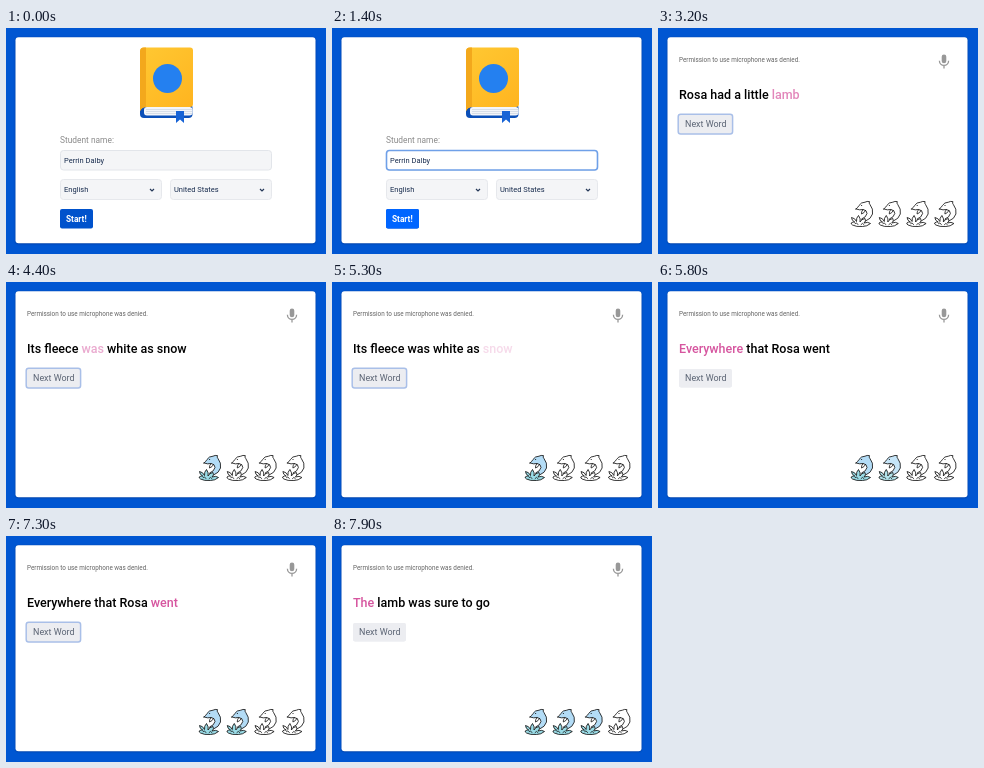
Animation of 320x226 px, one loop 8000 ms. Source, as an HTML page with a canvas:

```html
<!DOCTYPE html>
<html lang="en">
<head>
<meta charset="utf-8">
<title>Reading practice</title>
<style>
  html, body { margin: 0; width: 100%; height: 100%; overflow: hidden; background: #0056d2; }
  canvas { display: block; width: 320px; height: 226px; }
</style>
</head>
<body>
<canvas id="stage"></canvas>
<script>
const W = 320, H = 226, LOOP = 8000;
const INK = '#172b4d', PINK = '#d6559f', LINE = '#151515';
const canvas = document.getElementById('stage');
const ctx = canvas.getContext('2d');
const dpr = window.devicePixelRatio || 1;
canvas.width = W * dpr;
canvas.height = H * dpr;

// Each line lists the moment every word becomes the current one.
const LINES = [
  { text: 'Rosa had a little lamb', starts: [1600, 2450, 2600, 2760, 3100] },
  { text: 'Its fleece was white as snow', starts: [3500, 4190, 4330, 4600, 4860, 5270] },
  { text: 'Everywhere that Rosa went', starts: [5650, 6590, 6830, 7090] },
  { text: 'The lamb was sure to go', starts: [7500] }
];
const FADE_IN = 140, FADE_OUT = 100;
const TIMES = { focus: 900, startHover: 1350, practice: 1600, nextHover: 2050 };

const progress = (t, start, length = 200) => Math.max(0, Math.min(1, (t - start) / length));

function text(str, x, y, size, color, weight = 400) {
  ctx.font = `${weight} ${size}px Roboto, sans-serif`;
  ctx.fillStyle = color;
  ctx.fillText(str, x, y);
}

function box(x, y, w, h, r, fill, stroke, line = 1) {
  ctx.beginPath();
  ctx.roundRect(x, y, w, h, r);
  if (fill) { ctx.fillStyle = fill; ctx.fill(); }
  if (stroke) { ctx.strokeStyle = stroke; ctx.lineWidth = line; ctx.stroke(); }
}

function shape(d, fill, stroke, line = 1) {
  const path = new Path2D(d);
  if (fill) { ctx.fillStyle = fill; ctx.fill(path); }
  if (stroke) { ctx.strokeStyle = stroke; ctx.lineWidth = line; ctx.stroke(path); }
}

function withAlpha(alpha, paint) {
  if (alpha <= 0) return;
  ctx.save();
  ctx.globalAlpha = alpha;
  paint();
  ctx.restore();
}

function card() {
  ctx.fillStyle = '#0056d2';
  ctx.fillRect(0, 0, W, H);
  ctx.save();
  ctx.shadowColor = 'rgba(0, 20, 80, .45)';
  ctx.shadowBlur = 2 * dpr;
  ctx.shadowOffsetY = dpr * 0.5;
  box(9.5, 9.3, 300, 206, 3, '#fff');
  ctx.restore();
}

function book() {
  box(134, 76, 52.5, 14, 4, '#0b4fb8');
  box(138, 79, 48.5, 8.5, 3, '#f3f5f9');
  for (const y of [81.5, 83.5, 85.5]) shape(`M140 ${y}H186`, null, '#c5cedd', 0.6);
  const cover = ctx.createLinearGradient(134, 20, 187, 80);
  cover.addColorStop(0, '#ffc832');
  cover.addColorStop(1, '#ffb41f');
  shape('M138 19.5H184Q187 19.5 187 22.5V76Q187 79 184 79H140Q136 79 134 83V23.5Q134 19.5 138 19.5Z', cover);
  shape('M138 19.5H140V79Q136 79 134 83V23.5Q134 19.5 138 19.5Z', '#f3a81c');
  shape('M170 83H178V95L174 91.5L170 95Z', '#1763d6');
  ctx.beginPath();
  ctx.arc(161.5, 50.5, 14.5, 0, Math.PI * 2);
  ctx.fillStyle = '#2480f0';
  ctx.fill();
}

function select(x, label) {
  box(x + .5, 151.5, 101, 20, 3, '#f4f5f7', '#e6e8ec');
  text(label, x + 4, 164.4, 7.5, INK);
  shape(`M${x + 90} 161L${x + 92} 163L${x + 94} 161`, null, '#253858', 1.2);
}

function startScreen(t) {
  book();
  text('Student name:', 54, 115, 8.4, '#8b8b8b');
  box(54.5, 122.5, 211, 19.5, 3, '#f4f5f7', '#e2e5ea');
  withAlpha(progress(t, TIMES.focus), () => {
    box(54.5, 122.5, 211, 19.5, 3, '#fff', '#6fa0e8', 1.6);
  });
  text('Perrin Dalby', 58, 134.8, 7.5, INK);
  select(54, 'English');
  select(164, 'United States');
  box(54, 181, 33, 19.5, 2, '#0052cc');
  withAlpha(progress(t, TIMES.startHover, 50), () => box(54, 181, 33, 19.5, 2, '#0065ff'));
  text('Start!', 60, 193.7, 8.3, '#fff', 700);
}

function microphone() {
  box(283.7, 26.5, 4.6, 8.8, 2.3, '#989898');
  shape('M281.4 32.8A4.6 4.6 0 0 0 290.6 32.8M286 37.4V40.5', null, '#989898', 1.3);
}

const BODY = 'M6 8Q8 6.5 9 4.5Q11 1.2 15 1.2Q17 0 19.5 .6Q18.6 2.2 20 3.6Q23.5 8 22.5 13Q21 18 15.5 20Q12 20.5 11.5 18Q16 16.5 17 12.5Q17 9 13 8.5Q10 9.5 6 8Z';
const FIN = 'M13 8.5Q11 11 11.5 13Q14.5 12 15.5 9.5';
const SPLASH = 'M4.5 21Q1.5 19.5 1.5 16.5Q5 17 6.5 20.5Q6 17 8.5 14.5Q11 18 10 21Q11.5 18 15 17.5Q16.5 20 14 22Q18 20.5 20.5 22.5Q17 25.5 12.5 25.5Q6 26 2.5 24Q1 23.2 1.2 22Q3 20.5 4.5 21Z';
const RIPPLES = 'M5 22.5Q6.5 20.5 8 23.5M11 23.5Q12.5 21 14 23.5';

function dolphin(x, color) {
  ctx.save();
  ctx.translate(x, 173);
  ctx.lineJoin = ctx.lineCap = 'round';
  for (const [path, tint] of [[BODY, '#b3dcf6'], [SPLASH, '#9adbe6']]) {
    shape(path, '#fff');
    withAlpha(color, () => shape(path, tint));
    shape(path, null, LINE, .85);
  }
  shape(FIN + RIPPLES, null, LINE, .8);
  box(11, 3.9, 1.2, 1.2, .6, LINE);
  ctx.restore();
}

function sentence(line, t) {
  const following = LINES[LINES.indexOf(line) + 1];
  const ends = [...line.starts.slice(1), following ? following.starts[0] : Infinity];
  let x = 21;
  line.text.split(' ').forEach((word, i) => {
    const active = line.starts[i] <= t && t < ends[i];
    const alpha = active
      ? Math.min(progress(t, line.starts[i], FADE_IN), progress(-t, -ends[i], FADE_OUT))
      : 1;
    withAlpha(alpha, () => text(word, x, 71, 12.5, active ? PINK : '#000', 500));
    ctx.font = '500 12.5px Roboto, sans-serif';
    x += ctx.measureText(word + ' ').width;
  });
}

function nextButton(line, t) {
  box(21, 87, 53, 18.5, 2, '#f1f2f4');
  withAlpha(progress(t, TIMES.nextHover, 50), () => box(21, 87, 53, 18.5, 2, '#ecedf1'));
  if (line.starts.length > 1) {
    withAlpha(progress(t, line.starts[1] - FADE_OUT, 100), () => {
      box(20.2, 86.2, 54.4, 19.8, 2.5, null, '#a9bfe8', 1.5);
    });
  }
  text('Next Word', 27, 99.3, 8.95, '#5b6474');
}

function practiceScreen(t) {
  const line = LINES.filter(l => l.starts[0] <= t).pop();
  text('Permission to use microphone was denied.', 21, 34, 6.33, '#666');
  microphone();
  sentence(line, t);
  nextButton(line, t);
  for (let i = 0; i < 4; i++) {
    const next = LINES[i + 1];
    dolphin(192 + i * 27.8, next ? progress(t, next.starts[0]) : 0);
  }
}

function draw(t) {
  ctx.setTransform(dpr, 0, 0, dpr, 0, 0);
  card();
  (t < TIMES.practice ? startScreen : practiceScreen)(t);
}

let origin;
function tick(now) {
  origin ??= now;
  draw(Math.max(0, now - origin) % LOOP);
  requestAnimationFrame(tick);
}
requestAnimationFrame(tick);
</script>
</body>
</html>
```
